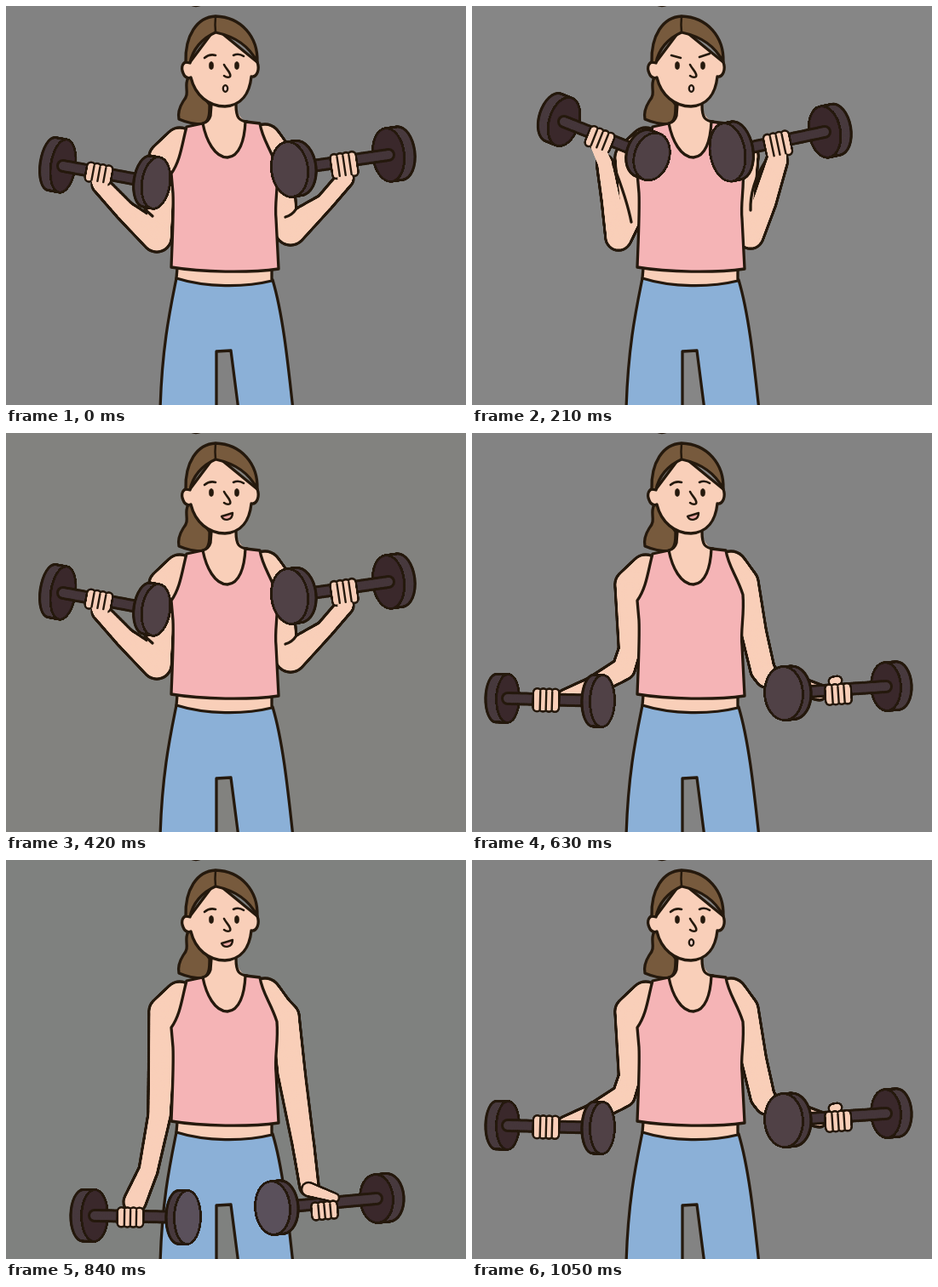
An HTML page with a canvas that plays this animation: 540x469 px, repeating every 1.26 s.

```html
<!DOCTYPE html>
<html lang="en">
<head>
<meta charset="utf-8">
<title>Dumbbell curls</title>
<style>
html, body { margin: 0; width: 100%; height: 100%; overflow: hidden; background: #828282; }
canvas { display: block; width: 540px; height: 469px; }
</style>
</head>
<body>
<canvas id="stage" width="540" height="469"></canvas>
<script>
const ctx = document.getElementById('stage').getContext('2d');
const INK = '#25190d', SKIN = '#f9cfb9', HAIR = '#775a3d', PINK = '#f5b4b6', BLUE = '#8bb0d7';
const RIM = '#483a3e', DARK = '#3a282b', LIT = '#504146', BAR = '#45363a';
const STEP = 210, LINE = 3.3;

// Joints are [x, y, radius]; every arm starts at its shoulder.
const SHOULDERS = [
  [[204, 160, 17], [185, 178, 17]],
  [[304, 157, 18], [319, 176, 17]],
];

// Each side: arm joints, the far and near plate [x, y, rx, ry],
// the fingers [x, y, length], and an optional fold line or thumb.
const high = [
  { arm: [[181, 235, 15], [177, 272, 17], [140, 241, 11.5], [111, 210, 10]],
    far: [67, 188, 14, 31], near: [176, 208, 16, 30], fingers: [109, 197, 14], fold: 'M163 239L172 247' },
  { arm: [[325, 245, 16], [334, 263, 18], [374, 231, 10], [398, 203, 10]],
    far: [449, 175, 18, 31], near: [333, 192, 21, 32], fingers: [397, 187, 20], fold: 'M328 248Q336 246 341 238' },
];
const raised = [
  { arm: [[186, 250, 12], [172, 272, 15], [164, 230, 11.5], [156, 185, 9.5]],
    far: [108, 136, 17, 29], near: [211, 177, 20, 28], fingers: [150, 157, 16], fold: 'M166 187Q182 228 187 254' },
  { arm: [[316, 250, 14], [327, 270, 15], [343, 230, 14], [358, 182, 12.5]],
    far: [414, 148, 18, 30], near: [300, 172, 20, 34], fingers: [359, 163, 20], fold: 'M344 183Q326 212 327 240' },
];
const low = [
  { arm: [[185, 255, 12.5], [178, 277, 13], [140, 299, 11], [108, 309, 7]],
    far: [42, 312, 13, 28], near: [153, 315, 14, 30], fingers: [87, 314, 18] },
  { arm: [[331, 235, 14.5], [341, 278, 14], [346, 286, 13], [408, 305, 9]],
    far: [486, 298, 17, 28], near: [366, 306, 22, 31], fingers: [430, 307, 15], thumb: [[424, 292, 5], [429, 291, 5]] },
];
const down = [
  { arm: [[182, 250, 14.5], [180, 300, 13], [167, 365, 11], [151, 402, 13]],
    far: [104, 418, 15, 30], near: [213, 420, 15, 31], fingers: [146, 420, 14] },
  { arm: [[328, 184, 16], [335, 250, 16], [349, 335, 12.5], [356, 384, 11]],
    far: [435, 398, 19, 28], near: [313, 409, 20, 31], fingers: [374, 412, 12], thumb: [[355, 387, 8], [386, 397, 5]] },
];

const frames = [
  { sides: high, bg: '#828282' },
  { sides: raised, bg: '#868686', frown: true },
  { sides: high, bg: '#82827f', smile: true },
  { sides: low, bg: '#838383', smile: true },
  { sides: down, bg: '#7f817f', smile: true, lit: '#5a505b' },
  { sides: low, bg: '#838383' },
];

function draw(d, fill, width = LINE) {
  const p = new Path2D(d);
  if (fill) { ctx.fillStyle = fill; ctx.fill(p); }
  ctx.lineWidth = width;
  if (width) ctx.stroke(p);
}

function oval(x, y, rx, ry, fill, width) {
  const p = new Path2D();
  p.ellipse(x, y, rx, ry, 0, 0, 7);
  draw(p, fill, width);
}

// Fills the shape swept by an ellipse [x, y, rx, ry] moving through the given points.
function sweep(points, fill, grow = 0, tilt = 0) {
  ctx.fillStyle = fill;
  for (let i = 1; i < points.length; i++) {
    for (let k = 0; k <= 40; k++) {
      const [x, y, rx, ry = rx] = points[i].map((v, j) => points[i - 1][j] + (v - points[i - 1][j]) * k / 40);
      ctx.beginPath();
      ctx.ellipse(x, y, rx + grow, ry + grow, tilt, 0, 7);
      ctx.fill();
    }
  }
}

function outlined(shapes, fill, tilt, width = LINE) {
  shapes.forEach(s => sweep(s, INK, width / 2, tilt));
  shapes.forEach(s => sweep(s, fill, -width / 2, tilt));
}

function dumbbell({ far, near }, lit) {
  const angle = Math.atan((near[1] - far[1]) / (near[0] - far[0]));
  const dx = Math.sign(near[0] - far[0]) * Math.cos(angle);
  const dy = Math.sign(near[0] - far[0]) * Math.sin(angle);
  const back = ([x, y, rx, ry], depth) => [x - dx * depth, y - dy * depth, rx - 1, ry];
  const plate = (face, depth, colour) => {
    outlined([[back(face, depth), face]], RIM, angle * 0.8);
    outlined([[face, face]], colour, angle * 0.8, 2.8);
  };
  plate(far, 14, DARK);
  outlined([[[far[0], far[1], 6.5], [...back(near, 11).slice(0, 2), 6.5]]], BAR, 0, 3);
  plate(near, 11, lit);
  return angle;
}

function hand({ arm, fingers: [x, y, length], thumb }, angle) {
  const c = Math.cos(angle), s = Math.sin(angle), wrist = arm[arm.length - 1];
  const at = (along, across) => [x + along * c - across * s, y + along * s + across * c];
  const finger = i => [[...at((i - 1.5) * 7, -length / 2), 4.5], [...at((i - 1.5) * 7, length / 2), 4.5]];
  if (thumb) outlined([thumb], SKIN, 0, 2.6);
  outlined([0, 1, 2, 3].map(finger), SKIN, 0, 2.6);
  if (wrist[1] > y) sweep([[...at(0, length / 2), 9], wrist], SKIN, -LINE / 2);
  for (const gap of [-7, 0, 7]) draw(`M${at(gap, -length / 2 - 1)}L${at(gap, length / 2 + 2)}`, null, 2.4);
}

function head(smile, frown) {
  draw('M216 66C207 64 205 72 208 79C210 85 215 85 217 84C222 105 238 118 257 118C277 117 286 102 288 83C295 84 298 74 295 66L246 26Z', SKIN);
  draw('M211 66C210 35 224 13 246 12C276 13 296 36 295 66C286 48 270 36 246 31C230 38 219 51 216 67Z', HAIR);
  draw('M246 12Q245 22 246 31', null, 2.5);
  draw(frown ? 'M234 58L245 61M267 60L279 56' : 'M233 61Q239 56 246 58M267 58Q273 55 279 59', null, 2.6);
  for (const x of [241, 271]) oval(x, 70, 2.6, 4.6, INK, 0.5);
  draw('M256 69C259 75 265 79 263 83Q260 85 256 82', null, 2.6);
  if (smile) draw('M253 98Q260 96 266 94C266 103 256 104 253 98Z', '#eba6a3', 2.4);
  else oval(257.5, 97, 2.7, 3.8, '#f9d6cc', 2.3);
}

function body() {
  draw('M241 112L240 131C238 137 225 140 214 143L240 180L285 178L297 140C285 137 270 136 270 112Z', SKIN, 0);
  draw('M241 116L240 129Q238 136 231 138M270 116C270 132 274 135 283 136');
  draw('M200 320C193 355 183 400 181 475L247 475L247 406L264 405L273 475L337 475C331 420 325 362 313 322', BLUE);
  draw('M201 308L200 320C235 331 280 331 312 323L312 310', SKIN);
  draw('M212 142L231 138C235 158 245 178 260 178C274 177 280 158 281 136L298 138C301 157 311 168 318 190C320 215 315 230 317 250L320 309C285 314 230 313 194 307C195 280 197 240 196 220L194 197C205 182 207 160 212 142Z', PINK);
}

function scene({ sides, bg, smile, frown, lit = LIT }) {
  ctx.fillStyle = bg;
  ctx.fillRect(0, 0, 540, 469);
  ctx.strokeStyle = INK;
  ctx.lineCap = ctx.lineJoin = 'round';
  oval(223, -7, 9, 6.5, HAIR);
  draw('M214 84C208 95 217 102 208 112C203 120 202 128 203 133C212 137 222 139 232 139C239 134 239 126 239 116L220 90', HAIR);
  sides.forEach(({ arm, fold }, i) => {
    outlined([[...SHOULDERS[i], ...arm]], SKIN);
    if (fold) draw(fold);
  });
  body();
  head(smile, frown);
  sides.forEach(side => hand(side, dumbbell(side, lit)));
}

function tick() {
  scene(frames[Math.floor(performance.now() / STEP) % frames.length]);
  requestAnimationFrame(tick);
}
tick();
</script>
</body>
</html>
```
